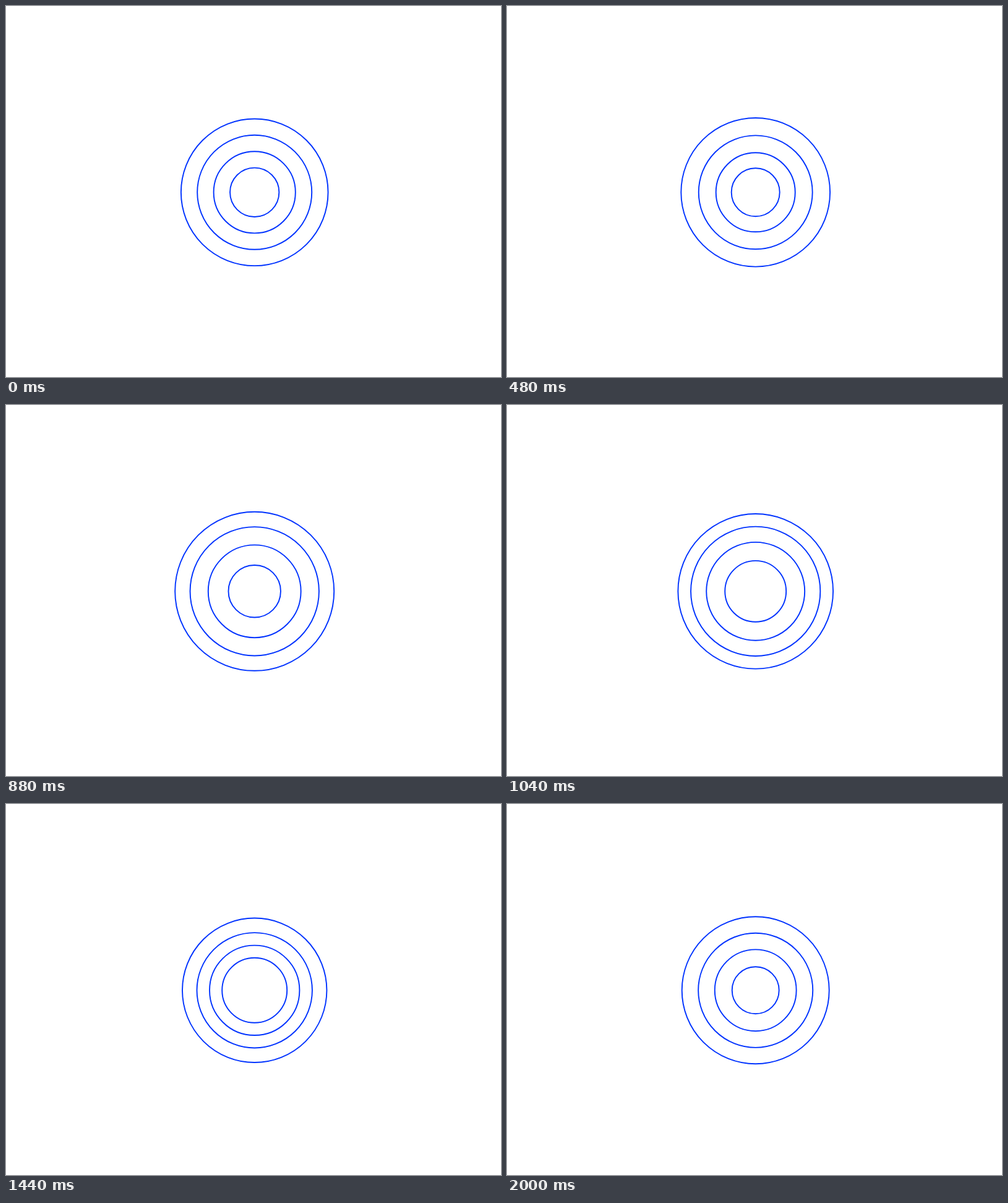
Animation, 800 px wide and 600 px high, one loop 2080 ms. Source, as an HTML page with a canvas:

```html
<!DOCTYPE html>
<html lang="en">
<head>
<meta charset="utf-8">
<title>Pulsing rings</title>
<style>
html, body { margin: 0; width: 100%; height: 100%; overflow: hidden; background: #fff; }
canvas { display: block; }
</style>
</head>
<body>
<canvas id="stage" width="800" height="600"></canvas>
<script>
const ctx = document.getElementById('stage').getContext('2d');
const LOOP = 2080, STEP = 80;
const CX = 401.7, CY = 301.3;
const OUTER = 119, GAP = 26.45;      // resting radii
const FIRST_PEAK = 830, DELAY = 152; // the pulse travels inwards

// Height, half-width (ms) and falloff of the pulse, outermost ring first
const pulses = [
  { amp: 9.7, width: 390, falloff: 0.2 },
  { amp: 12.3, width: 480, falloff: 0.35 },
  { amp: 14.1, width: 460, falloff: 0.35 },
  { amp: 14.8, width: 470, falloff: 0.35 }
];

function radius(i, t) {
  const { amp, width, falloff } = pulses[i];
  const u = (t - FIRST_PEAK - DELAY * i) / width;
  const wave = Math.cos(Math.PI / 2 * u) * Math.exp(-falloff * u ** 4);
  return OUTER - GAP * i + amp * wave;
}

function draw(t) {
  ctx.fillStyle = '#fff';
  ctx.fillRect(0, 0, 800, 600);
  ctx.strokeStyle = '#0033ff';
  ctx.lineWidth = 1.9;
  for (let i = 0; i < pulses.length; i++) {
    ctx.beginPath();
    ctx.arc(CX, CY, radius(i, t), 0, Math.PI * 2);
    ctx.stroke();
  }
}

const start = performance.now();
function tick() {
  const t = (performance.now() - start) % LOOP;
  draw(Math.floor(t / STEP) * STEP);
  requestAnimationFrame(tick);
}
tick();
</script>
</body>
</html>
```
